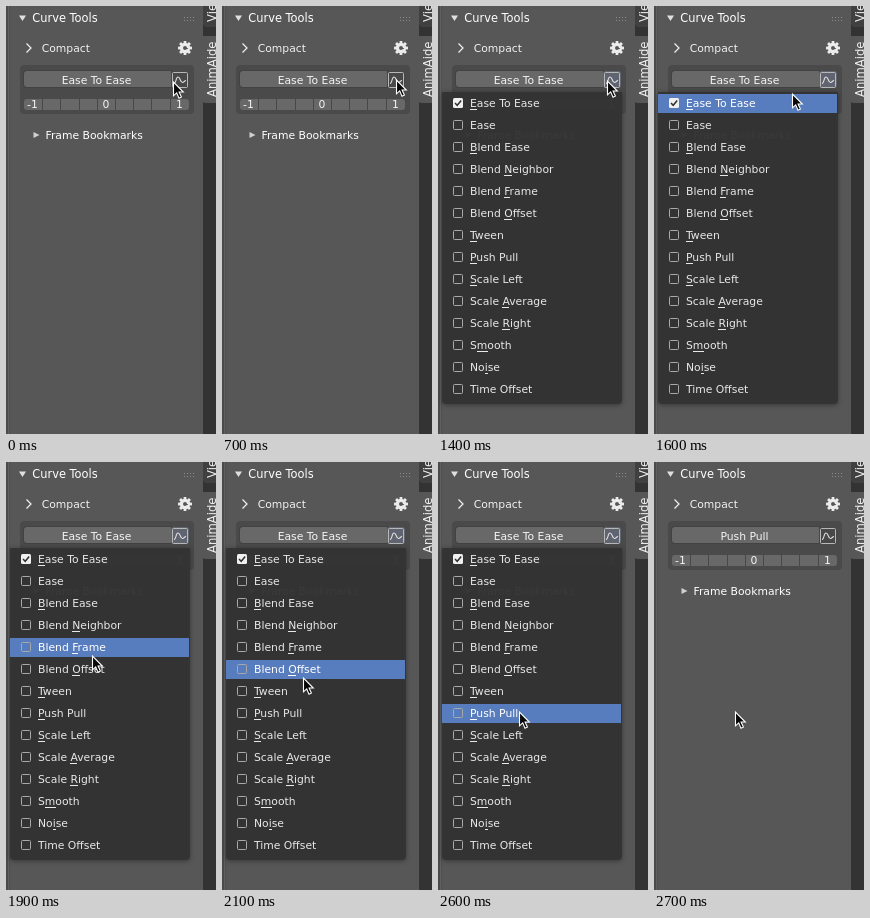
Write an HTML page with a canvas that moves like this. It is 210 px wide and 428 px high and loops after 3700 ms.

```html
<!DOCTYPE html>
<html lang="en">
<head>
<meta charset="utf-8">
<title>Curve Tools panel</title>
<style>
html, body { margin: 0; width: 100%; height: 100%; overflow: hidden; background: #575757; }
canvas { display: block; width: 210px; height: 428px; }
</style>
</head>
<body>
<canvas id="stage"></canvas>
<script>
const W = 210, H = 428, LOOP = 3700, STEP = 100;
const MENU_OPEN = 800, MENU_CLOSE = 2700;
const ROW = 22, FIRST_ROW = 97;
const canvas = document.getElementById('stage');
const ctx = canvas.getContext('2d');
const ratio = window.devicePixelRatio || 1;
canvas.width = W * ratio;
canvas.height = H * ratio;

// Label and index of the underlined shortcut letter (-1 for none)
const items = [
  ['Ease To Ease', 0], ['Ease', -1], ['Blend Ease', 0], ['Blend Neighbor', 6],
  ['Blend Frame', 6], ['Blend Offset', 6], ['Tween', 0], ['Push Pull', 0],
  ['Scale Left', 0], ['Scale Average', 6], ['Scale Right', 6], ['Smooth', 1],
  ['Noise', 2], ['Time Offset', -1]
];

// Pointer path: time, x, y
const path = [
  [0, 167, 75], [100, 170, 74], [300, 174, 73], [1300, 174, 73],
  [1400, 169, 74], [1600, 138, 87], [1700, 119, 115], [1900, 86, 193],
  [2000, 82, 206], [2100, 81, 215], [2200, 81, 236], [2300, 81, 257],
  [2400, 81, 249], [LOOP, 81, 249]
];

function pointerAt(t) {
  const i = path.findIndex(p => p[0] > t);
  const [t0, x0, y0] = path[i - 1], [t1, x1, y1] = path[i];
  const k = (t - t0) / (t1 - t0);
  return [Math.round(x0 + (x1 - x0) * k), Math.round(y0 + (y1 - y0) * k)];
}

function rect(x, y, w, h, color) {
  ctx.fillStyle = color;
  ctx.fillRect(x, y, w, h);
}

function box(x, y, w, h, r, color) {
  ctx.beginPath();
  ctx.roundRect(x, y, w, h, r);
  ctx.fillStyle = color;
  ctx.fill();
}

function outline(x, y, w, h, r, color) {
  ctx.beginPath();
  ctx.roundRect(x + 0.5, y + 0.5, w - 1, h - 1, r);
  ctx.strokeStyle = color;
  ctx.lineWidth = 1;
  ctx.stroke();
}

function poly(points, color) {
  ctx.beginPath();
  points.forEach(([x, y]) => ctx.lineTo(x, y));
  ctx.closePath();
  ctx.fillStyle = color;
  ctx.fill();
}

function line(points, color, width) {
  ctx.beginPath();
  points.forEach(([x, y]) => ctx.lineTo(x, y));
  ctx.strokeStyle = color;
  ctx.lineWidth = width;
  ctx.stroke();
}

function text(str, x, y, color = '#f0f0f0', align = 'left', size = 10.8) {
  ctx.font = size + 'px "DejaVu Sans", sans-serif';
  ctx.textAlign = align;
  ctx.fillStyle = color;
  ctx.fillText(str, x, y);
}

function sideText(str, y) {
  ctx.save();
  ctx.translate(209.5, y);
  ctx.rotate(-Math.PI / 2);
  text(str, 0, 0, '#f0f0f0', 'left', 11.6);
  ctx.restore();
}

function drawGear(x, y) {
  ctx.save();
  ctx.translate(x, y);
  ctx.fillStyle = '#ececec';
  for (let i = 0; i < 8; i++) {
    ctx.fillRect(-1.4, -7, 2.8, 4);
    ctx.rotate(Math.PI / 4);
  }
  ctx.beginPath();
  ctx.arc(0, 0, 5.2, 0, 7);
  ctx.arc(0, 0, 2, 0, 7, true);
  ctx.fill('evenodd');
  ctx.restore();
}

function drawSidebar() {
  rect(0, 0, W, H, '#575757');
  rect(0, 0, 2, H, '#4a4a4a');
  rect(2, 0, 1, H, '#606060');
  rect(3, 0, 1, H, '#505050');
  rect(197, 0, 13, H, '#333333');
  box(197, -8, 20, 29, 4, '#404040');
  box(196, 30, 20, 67, [0, 0, 0, 4], '#575757');
  sideText('View', 16);
  sideText('AnimAide', 91);
}

function drawCurveButton(open) {
  box(165, 65, 18, 17, 3, open ? '#606470' : '#484848');
  outline(166, 66, 16, 16, 1, '#b8b8b8');
  ctx.beginPath();
  ctx.moveTo(168, 77.5);
  ctx.bezierCurveTo(170.5, 77.5, 169.5, 71, 172, 71);
  ctx.bezierCurveTo(174.5, 71, 174, 76.5, 176.5, 76.5);
  ctx.bezierCurveTo(178, 76.5, 178.5, 74.5, 180, 74.5);
  ctx.strokeStyle = '#e0e0e0';
  ctx.lineWidth = 1.1;
  ctx.stroke();
}

function drawPanel(tool, open) {
  poly([[13, 9.5], [20, 9.5], [16.5, 15]], '#e0e0e0');
  text('Curve Tools', 26.3, 16, '#ffffff', 'left', 11.4);
  for (let i = 0; i < 8; i++) {
    rect(178 + (i % 4) * 3, i < 4 ? 11 : 14, 1, 1, '#888888');
  }

  line([[20.5, 37.5], [25, 42], [20.5, 46.5]], '#ececec', 1.3);
  text('Compact', 35.7, 46);
  drawGear(179, 42);

  box(14, 59, 174, 49, 4, '#4a4a4a');
  box(17, 64, 149, 18, [4, 0, 0, 4], '#424242');
  box(18, 65, 147, 16, [3, 0, 0, 3], '#686868');
  text(tool, 90.5, 77.5, '#f4f4f4', 'center');
  drawCurveButton(open);

  box(18, 93, 165, 11, 3, '#686868');
  for (let i = 1; i < 9; i++) rect(Math.round(18 + i * 18.2), 93, 1, 11, '#484848');
  text('-1', 26.5, 102, '#f4f4f4', 'center');
  text('0', 100, 102, '#f4f4f4', 'center');
  text('1', 173.5, 102, '#f4f4f4', 'center');

  poly([[27.5, 126], [33.5, 129], [27.5, 132]], '#d0d0d0');
  text('Frame Bookmarks', 39.5, 133, '#ffffff');
}

function drawCheckbox(y, checked) {
  if (!checked) return outline(15, y - 5, 10, 10, 1, '#a8a8a8');
  box(15, y - 5, 10, 10, 1.5, '#f0f0f0');
  line([[17, y], [19.2, y + 2.3], [23.2, y - 2.5]], '#303030', 1.5);
}

function drawItem([label, key], i, hot) {
  const y = FIRST_ROW + i * ROW;
  if (hot) rect(4, y - 9, 179, 19, '#587dbe');
  drawCheckbox(y, i === 0);
  const color = hot ? '#ffffff' : '#e8e8e8';
  text(label, 32, y + 4, color);
  if (key >= 0) {
    const x = 32 + ctx.measureText(label.slice(0, key)).width;
    rect(Math.round(x), y + 6, Math.round(ctx.measureText(label[key]).width), 1, color);
  }
}

function drawMenu(pointerY) {
  ctx.save();
  ctx.shadowColor = 'rgba(0,0,0,0.4)';
  ctx.shadowBlur = 5 * ratio;
  ctx.shadowOffsetY = ratio;
  box(4, 86, 180, 312, [0, 0, 4, 4], 'rgba(51,51,51,0.94)');
  ctx.restore();
  const hot = Math.floor((pointerY - FIRST_ROW + ROW / 2) / ROW);
  items.forEach((item, i) => drawItem(item, i, i === hot));
}

function drawPointer(x, y) {
  ctx.save();
  ctx.translate(x + 0.5, y + 1);
  ctx.beginPath();
  [[0, 0], [0, 13.8], [3.2, 10.9], [5.5, 16.2], [7.9, 15.1], [5.6, 10], [9.8, 10]]
    .forEach(p => ctx.lineTo(...p));
  ctx.closePath();
  ctx.fillStyle = '#080808';
  ctx.fill();
  ctx.strokeStyle = '#ffffff';
  ctx.lineWidth = 1.1;
  ctx.stroke();
  ctx.restore();
}

function draw(t) {
  const open = t >= MENU_OPEN && t < MENU_CLOSE;
  const [x, y] = pointerAt(t);
  ctx.setTransform(ratio, 0, 0, ratio, 0, 0);
  drawSidebar();
  drawPanel(t < MENU_CLOSE ? 'Ease To Ease' : 'Push Pull', open);
  if (open) drawMenu(y);
  drawPointer(x, y);
}

const start = performance.now();
function tick() {
  const t = (performance.now() - start) % LOOP;
  draw(Math.floor(t / STEP) * STEP);
  requestAnimationFrame(tick);
}
tick();
</script>
</body>
</html>
```
